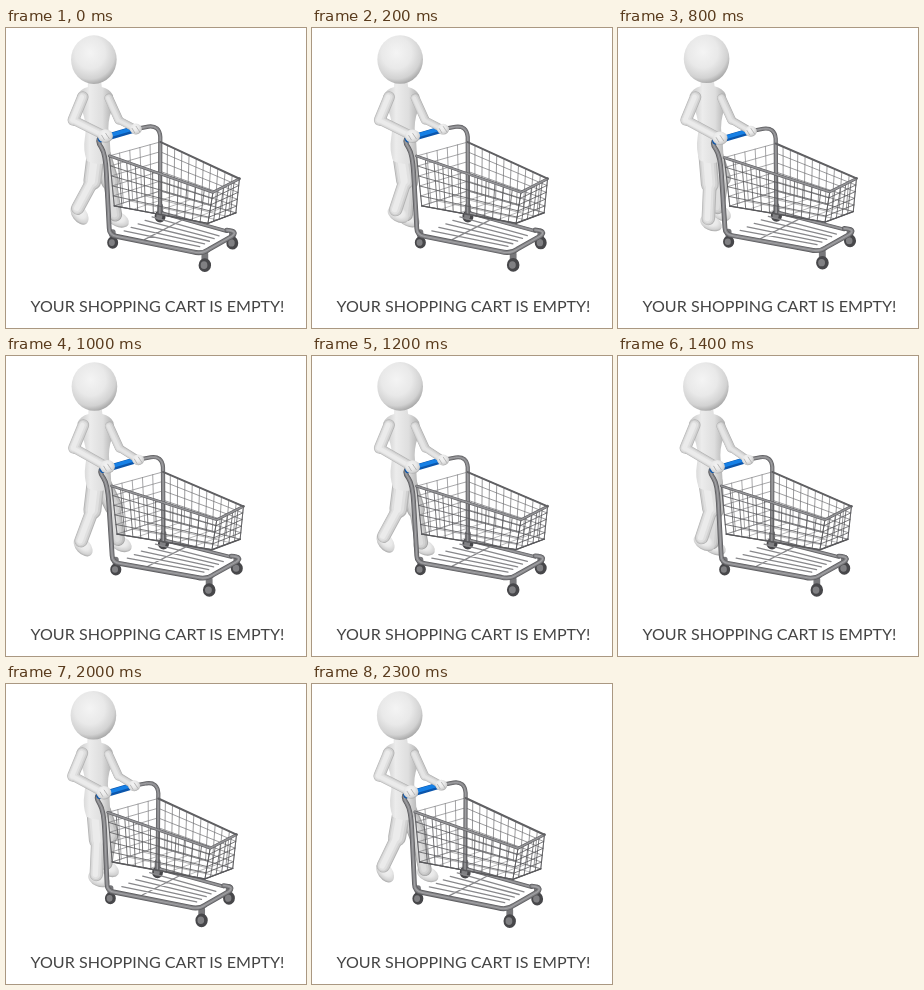
An HTML page for the animation above (2400 ms loop, 300 by 300 pixels).

```html
<!DOCTYPE html>
<html lang="en">
<head>
<meta charset="utf-8">
<title>Empty cart</title>
<style>
  html, body { margin: 0; width: 100%; height: 100%; overflow: hidden; background: #fff; }
  svg { display: block; width: 100vw; height: 100vh; }
  text { font: 16.1px Lato, "Open Sans", sans-serif; fill: #444; }
</style>
</head>
<body>
<svg viewBox="0 0 300 300">
  <defs>
    <radialGradient id="ball" cx=".42" cy=".36" r=".66">
      <stop offset="0" stop-color="#f4f4f4"/>
      <stop offset=".5" stop-color="#e9e9e9"/>
      <stop offset=".82" stop-color="#d2d2d2"/>
      <stop offset="1" stop-color="#a6a6a6"/>
    </radialGradient>
    <linearGradient id="torso">
      <stop offset="0" stop-color="#c2c2c2"/>
      <stop offset=".35" stop-color="#ececec"/>
      <stop offset=".7" stop-color="#dedede"/>
      <stop offset="1" stop-color="#adadad"/>
    </linearGradient>
  </defs>
  <g id="legs"></g>
  <g id="body">
    <path d="M71 68Q74 61 82 59L82 52H95L96 59Q104 61 107 67Q109 76 104 88Q101 100 104 113L105 131Q96 140 81 133Q77 122 79 110Q81 99 78 88Z" fill="url(#torso)"/>
    <ellipse cx="88" cy="31.5" rx="22.8" ry="24.3" fill="url(#ball)"/>
  </g>
  <g id="cart" fill="none" stroke-linecap="round" stroke-linejoin="round"></g>
  <g id="arms"></g>
  <text x="151.5" y="284" text-anchor="middle">YOUR SHOPPING CART IS EMPTY!</text>
</svg>
<script>
const TAU = Math.PI * 2, LOOP = 2400, STRIDE = 1200, STEP = 100;
const $ = id => document.getElementById(id);
const mix = (a, b, k) => a.map((v, i) => v + (b[i] - v) * k);
const seg = (a, b) => `M${a}L${b}`;

// ---- cart ----
function mesh(a, b, c, d, cols, rows) {
  let path = '';
  for (let i = 0; i <= cols; i++) path += seg(mix(a, b, i / cols), mix(d, c, i / cols));
  for (let j = 0; j <= rows; j++) path += seg(mix(a, d, j / rows), mix(b, c, j / rows));
  return path;
}
const line = (d, color, width) => `<path d="${d}" stroke="${color}" stroke-width="${width}"/>`;
const tube = (d, width) =>
  line(d, '#5f5f62', width) + line(d, '#858588', width * .65) + line(d, '#a2a2a5', width * .22);

function wheel(x, y, r) {
  return line(`M${x} ${y - r - 4}V${y - 2}`, '#77777a', r) +
    `<ellipse cx="${x}" cy="${y}" rx="${r * .92}" ry="${r}" fill="#47474a"/>` +
    `<ellipse cx="${x - .8}" cy="${y}" rx="${r * .5}" ry="${r * .55}" fill="#808083"/>`;
}

function buildCart() {
  const nearTop = [104, 129], nearBottom = [109, 178], farTop = [155, 115], farBottom = [155, 163];
  const frontTop = [208, 164], frontBottom = [203, 194.5], endTop = [234.5, 150.5], endBottom = [231, 184];
  const rackNear = [112, 206], rackFar = [154, 185], rackFront = [190, 220], rackEnd = [219, 204];
  let rack = '';
  for (let i = 1; i < 6; i++) rack += seg(mix(rackNear, rackFar, i / 6), mix(rackFront, rackEnd, i / 6));
  rack += seg(mix(rackNear, rackFront, .35), mix(rackFar, rackEnd, .35));
  return wheel(155, 188, 6) +
    tube('M154 184L222 202', 3.6) +
    line(rack, '#88888b', 1.3) +
    line(mesh(nearBottom, farBottom, endBottom, frontBottom, 3, 5), '#8a8a8c', .6) +
    line(mesh(farTop, endTop, endBottom, farBottom, 11, 5), '#707073', .7) +
    line(mesh(nearTop, farTop, farBottom, nearBottom, 5, 5), '#808083', .7) +
    tube('M130 102.5L143 100Q154 98.5 155 110V185', 4.2) +
    line(mesh(nearTop, frontTop, frontBottom, nearBottom, 12, 5), '#58585b', .8) +
    line(mesh(frontTop, endTop, endBottom, frontBottom, 5, 5), '#58585b', .8) +
    tube(seg(nearTop, frontTop) + 'L' + endTop, 2.8) +
    line(seg(farTop, endTop), '#606063', 2) +
    line(seg(nearBottom, frontBottom) + 'L' + endBottom, '#58585b', 1.4) +
    wheel(107.5, 214, 6) + wheel(227.5, 213.5, 6.5) + wheel(200, 235.5, 6.8) +
    tube('M95 111Q91 114 96 121Q100 127 101 146L104 200Q104 207 112 208L188 222.5Q197 225 204 220L227 207Q234 202 222 201', 4.8) +
    line('M95.5 112.5L128 103', '#0b55ab', 6.5) +
    line('M96 111.5L128 102', '#1680e6', 3.8);
}
$('cart').innerHTML = buildCart();

// Slight sway of the cart as an affine map.
function sway(t) {
  const s = Math.sin(TAU * (t - 100) / LOOP), c = Math.cos(TAU * t / LOOP);
  return [1 + .012 * s, .007 * c, .01 * s, 1 + .02 * c, -.19 * s, -4.44 * c];
}
const apply = ([a, b, c, d, e, f], [x, y]) => [a * x + c * y + e, b * x + d * y + f];

// ---- figure ----
function limb([a, b, c], upper, lower, dim = 0) {
  const coat = (tone, k, shift) => {
    const g = tone - dim;
    return `<g transform="translate(${shift})" fill="none" stroke-linecap="round" stroke="rgb(${g},${g},${g})">` +
      `<path d="${seg(a, b)}" stroke-width="${upper * k}"/>` +
      `<path d="${seg(b, c)}" stroke-width="${lower * k}"/></g>`;
  };
  return coat(180, 1, 0) + coat(208, .88, -.2) + coat(224, .68, -.6) + coat(235, .4, -1);
}

function foot([x, y], angle) {
  const r = angle * TAU / 360;
  const cx = x + 3 * Math.cos(r), cy = y + 3 + 4 * Math.sin(r);
  return `<ellipse cx="${cx}" cy="${cy}" rx="11.5" ry="7.3" transform="rotate(${angle} ${cx} ${cy})" fill="url(#ball)"/>`;
}

function leg(hip, ankle, back, lift, dim) {
  const [dx, dy] = [ankle[0] - hip[0], ankle[1] - hip[1]];
  const bend = (2 + 4 * lift + 2 * Math.max(0, back)) / Math.hypot(dx, dy);
  const mid = mix(hip, ankle, .45);
  const knee = [mid[0] + dy * bend, mid[1] - dx * bend];
  return foot(ankle, 25 + 30 * Math.max(0, back)) + limb([hip, knee, ankle], 18, 13.5, dim);
}

function walk(t) {
  const phase = TAU * (t + 60) / STRIDE;
  const c = Math.cos(phase), s = Math.sin(phase);
  return leg([96, 127], [97 + 15 * c - 6 * s, 183 + 3 * c + 3 * s], -c, Math.max(0, -s), 14) +
    leg([89.5, 128], [87 - 16 * c, 186 - 5 * c - 3.5 * s], c, Math.max(0, s), 0);
}

const hand = ([x, y], r) =>
  `<ellipse cx="${x}" cy="${y}" rx="${r}" ry="${r * .9}" fill="url(#ball)"/>` +
  `<path d="M${x} ${y - 3}l4 6M${x - 4} ${y - 1}l3 5" stroke="#aaa" stroke-width=".8"/>`;

function arms(m, lean) {
  const near = apply(m, [100, 109.5]), far = apply(m, [130.5, 102.5]);
  return limb([[103 + lean, 70], [113 + lean, 92], far], 9, 7.5, 6) + hand(far, 6) +
    limb([[77 + lean, 69], [67.5 + lean, 92], near], 11.5, 9.5) + hand(near, 7.5);
}

function draw(time) {
  const t = Math.floor(time % LOOP / STEP) * STEP;
  const m = sway(t);
  const lean = .6 * Math.sin(TAU * (t - 100) / LOOP);
  const bob = -.5 + .6 * Math.cos(TAU * t / LOOP);
  $('cart').setAttribute('transform', `matrix(${m})`);
  $('body').setAttribute('transform', `translate(${lean} ${bob})`);
  $('legs').innerHTML = walk(t);
  $('arms').innerHTML = arms(m, lean);
}

const start = performance.now();
function tick() {
  draw(performance.now() - start);
  requestAnimationFrame(tick);
}
tick();
</script>
</body>
</html>
```
